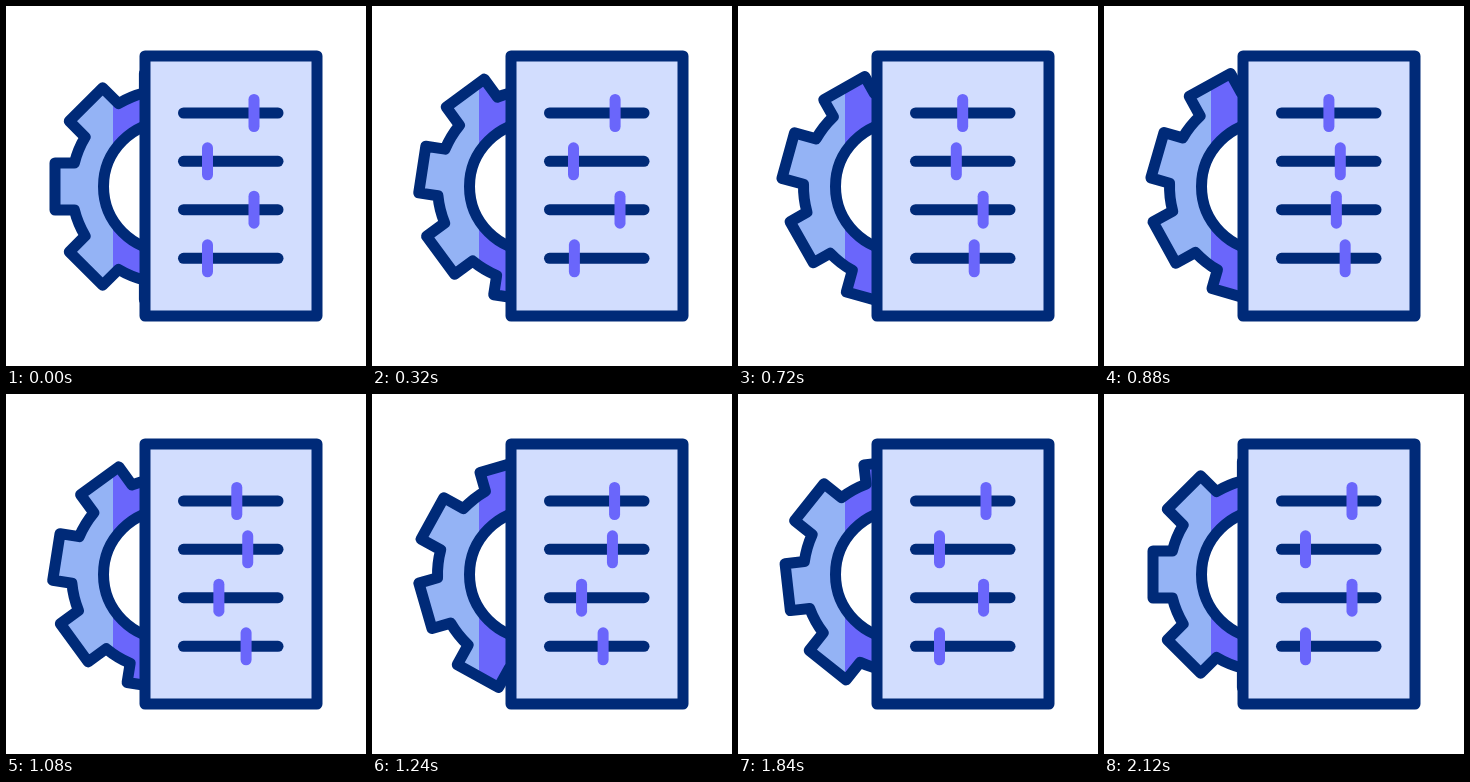
An HTML page that plays this animation: 360x360 px, repeating every 2160 ms.

```html
<!DOCTYPE html>
<html lang="en">
<head>
<meta charset="utf-8">
<title>Settings icon</title>
<style>
  html, body { margin: 0; width: 100%; height: 100%; overflow: hidden; background: #fff; }
  svg { display: block; width: 100vw; height: 100vh; }
  .ink { stroke: #002a78; }
  .accent { stroke: #6a66fb; }
</style>
</head>
<body>
<svg viewBox="0 0 360 360" fill="none" stroke-width="11" stroke-linecap="round" stroke-linejoin="round">
  <defs>
    <clipPath id="shade"><rect x="107" y="0" width="253" height="360"/></clipPath>
    <path id="gear"/>
  </defs>
  <use href="#gear" fill="#94b3f5"/>
  <g clip-path="url(#shade)"><use href="#gear" fill="#6a66fb"/></g>
  <use href="#gear" class="ink"/>
  <circle cx="162" cy="180.5" r="64.5" fill="#fff" class="ink"/>
  <rect x="139" y="50" width="172" height="260" fill="#d2ddfe" class="ink"/>
  <g id="sliders"></g>
</svg>
<script>
const LOOP = 2160, STEP = 40, SPIN = 2120;
const CENTER = { x: 162, y: 180.5 };
const SLIDE = 735;
const sliders = [
  { y: 107, home: 248, travel: -23.5, start: 50 },
  { y: 155.3, home: 201.5, travel: 40.3, start: 376 },
  { y: 203.7, home: 248, travel: -38.5, start: 539 },
  { y: 252.3, home: 201.5, travel: 40, start: 213 }
];

const gear = document.getElementById('gear');
const group = document.getElementById('sliders');

function addLine(x1, y1, x2, y2, className) {
  const line = document.createElementNS('http://www.w3.org/2000/svg', 'line');
  const attrs = { x1, y1, x2, y2, class: className };
  for (const key in attrs) line.setAttribute(key, attrs[key]);
  group.append(line);
  return line;
}

for (const s of sliders) {
  addLine(177.5, s.y, 272, s.y, 'ink');
  s.knob = addLine(0, s.y - 13.5, 0, s.y + 13.5, 'accent');
}

// Cubic-bezier(.62, 0, .38, 1), solved by bisection.
function ease(x) {
  if (x <= 0) return 0;
  if (x >= 1) return 1;
  let lo = 0, hi = 1;
  for (let i = 0; i < 24; i++) {
    const s = (lo + hi) / 2, r = 1 - s;
    if (1.86 * s * r * r + 1.14 * s * s * r + s * s * s < x) lo = s;
    else hi = s;
  }
  return lo * lo * (3 - 2 * lo);
}

// Eight teeth; the diagonal ones reach a little further.
function gearPath(degrees) {
  const root = 96.5, half = 23.6;
  const base = Math.sqrt(root * root - half * half);
  let d = '';
  for (let i = 0; i < 8; i++) {
    const a = (degrees + i * 45) * Math.PI / 180;
    const c = Math.cos(a), s = Math.sin(a);
    const point = (along, across) =>
      (CENTER.x + along * c - across * s).toFixed(2) + ' ' +
      (CENTER.y + along * s + across * c).toFixed(2);
    const tip = i % 2 ? 116 : 113;
    d += (i ? `A${root} ${root} 0 0 1 ` : 'M') + point(base, -half);
    d += 'L' + point(tip, -half) + 'L' + point(tip, half) + 'L' + point(base, half);
    if (i === 7) {
      const a0 = degrees * Math.PI / 180;
      const x = CENTER.x + base * Math.cos(a0) + half * Math.sin(a0);
      const y = CENTER.y + base * Math.sin(a0) - half * Math.cos(a0);
      d += `A${root} ${root} 0 0 1 ${x.toFixed(2)} ${y.toFixed(2)}Z`;
    }
  }
  return d;
}

function draw(time) {
  const t = Math.floor((time % LOOP) / STEP + 0.02) * STEP % LOOP;
  gear.setAttribute('d', gearPath(360 * ease(t / SPIN)));
  for (const s of sliders) {
    const phase = (t - s.start) / SLIDE;
    const x = s.home + s.travel * ease(1 - Math.abs(phase - 1));
    s.knob.setAttribute('x1', x);
    s.knob.setAttribute('x2', x);
  }
}

function tick(now) {
  draw(now);
  requestAnimationFrame(tick);
}
draw(0);
requestAnimationFrame(tick);
</script>
</body>
</html>
```
